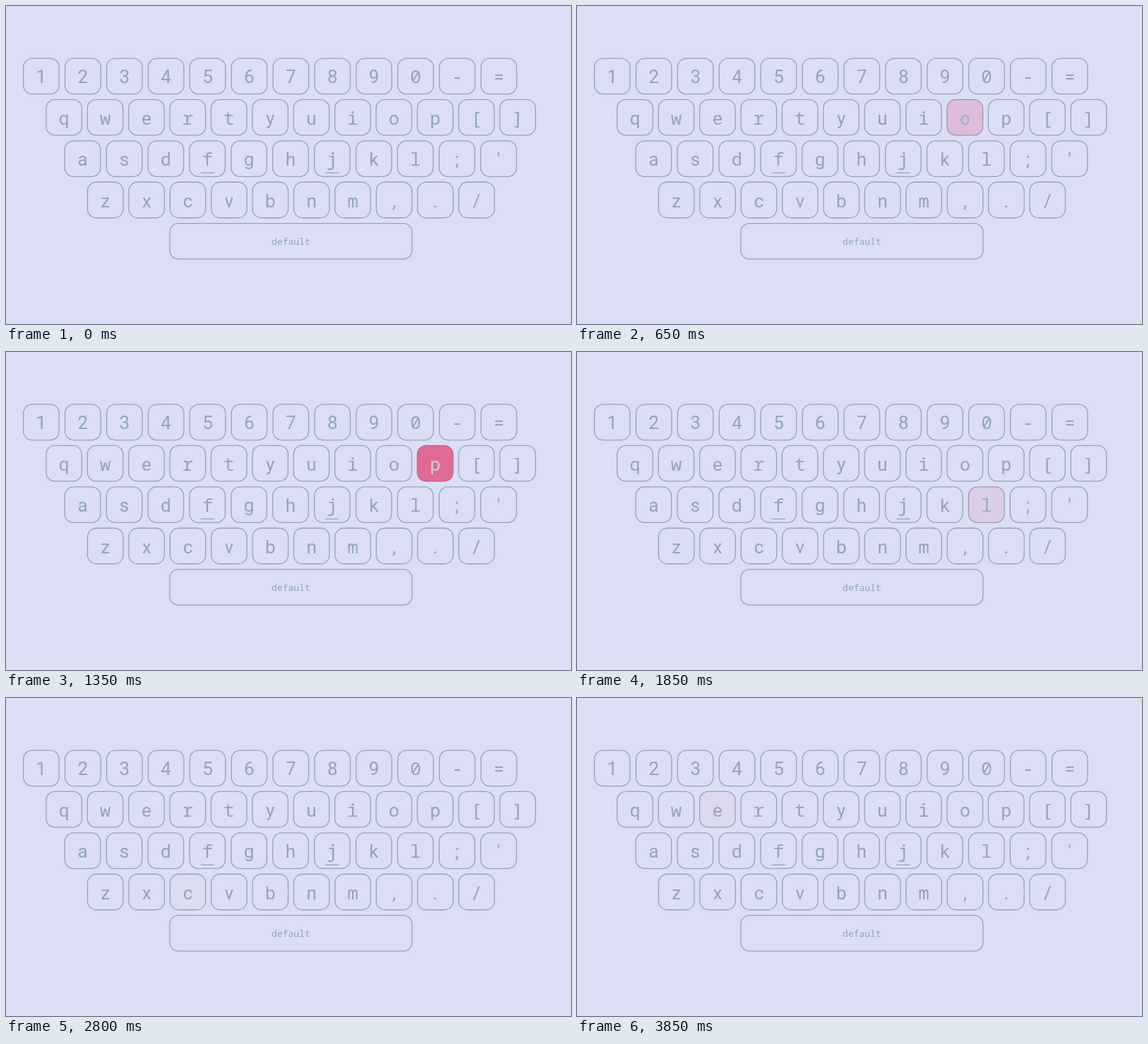
An HTML page that plays this animation: 800x450 px, repeating every 4000 ms.

```html
<!DOCTYPE html>
<html lang="en">
<head>
<meta charset="utf-8">
<title>Keyboard</title>
<style>
  html, body { margin: 0; width: 100%; height: 100%; overflow: hidden; background: #dbdef4; }
  svg { display: block; width: 100vw; height: 100vh; }
  rect { fill: #df4576; fill-opacity: 0; stroke: #92a4be; stroke-width: 1.3; }
  line { stroke: #92a4be; stroke-width: 1.3; }
  text { fill: #92a4be; text-anchor: middle; font: 26px Roboto, "Noto Sans Mono", sans-serif; }
  text.mono { font-family: "Noto Sans Mono", monospace; }
  text.small { font-size: 13px; }
</style>
</head>
<body>
<svg id="board" viewBox="0 0 800 450"></svg>
<script>
const LOOP = 4000, STEP = 50, LAST = 3850, FADE = 500;
const BG = [219, 222, 244], SUB = [146, 164, 190], HIT = [223, 69, 118];
const SIZE = 51.8, TOP = 73.4, ROW_PITCH = 58.4;

// characters, left edge, key pitch
const ROWS = [
  ["1234567890-=", 24, 58.9],
  ["qwertyuiop[]", 56.2, 58.4],
  ["asdfghjkl;'", 82.6, 58.9],
  ["zxcvbnm,./", 114.8, 58.4]
];
const MONO = "mwilfjrt0-[]";

// key, time of the press in ms
const PRESSES = [
  ["c", 30], ["o", 538], ["m", 828], ["p", 1329], ["l", 1691],
  ["i", 2112], ["c", 2470], ["a", 2820], ["t", 3201], ["e", 3605]
];

const board = document.getElementById("board");
const keys = {};

function add(tag, attrs, text) {
  const el = document.createElementNS("http://www.w3.org/2000/svg", tag);
  for (const name in attrs) el.setAttribute(name, attrs[name]);
  if (text) el.textContent = text;
  return board.appendChild(el);
}

function addBox(x, y, width) {
  return add("rect", { x: x + 0.65, y: y + 0.65, width: width - 1.3, height: SIZE - 1.3, rx: 12.4 });
}

ROWS.forEach(([chars, left, pitch], row) => {
  const y = TOP + row * ROW_PITCH;
  [...chars].forEach((char, i) => {
    const x = left + i * pitch, mid = x + SIZE / 2;
    const box = addBox(x, y, SIZE);
    const label = add("text", { x: mid, y: y + 36, class: MONO.includes(char) ? "mono" : "" }, char);
    if ("fj".includes(char)) add("line", { x1: mid - 9.5, x2: mid + 9.5, y1: y + 46, y2: y + 46 });
    keys[char] = { box, label };
  });
});

const spaceY = TOP + 4 * ROW_PITCH;
addBox(231.2, spaceY, 344.4);
add("text", { x: 403.4, y: spaceY + 31, class: "mono small" }, "default");

const mix = (a, b, k) => `rgb(${a.map((v, i) => Math.round(v + (b[i] - v) * k))})`;

// Exponential ease-out: the share of the flash that is left
function glow(age) {
  return age < 0 || age >= FADE ? 0 : 2 ** (-10 * age / FADE);
}

function draw(time) {
  const t = Math.min(LAST, Math.floor(time % LOOP / STEP) * STEP);
  const levels = {};
  for (const [char, at] of PRESSES) levels[char] = Math.max(levels[char] || 0, glow(t - at));
  for (const char in levels) {
    const { box, label } = keys[char], k = levels[char];
    box.style.fillOpacity = k;
    box.style.stroke = mix(SUB, HIT, k);
    label.style.fill = mix(SUB, BG, k);
  }
}

const start = performance.now();
function tick() {
  draw(performance.now() - start);
  requestAnimationFrame(tick);
}
tick();
</script>
</body>
</html>
```
